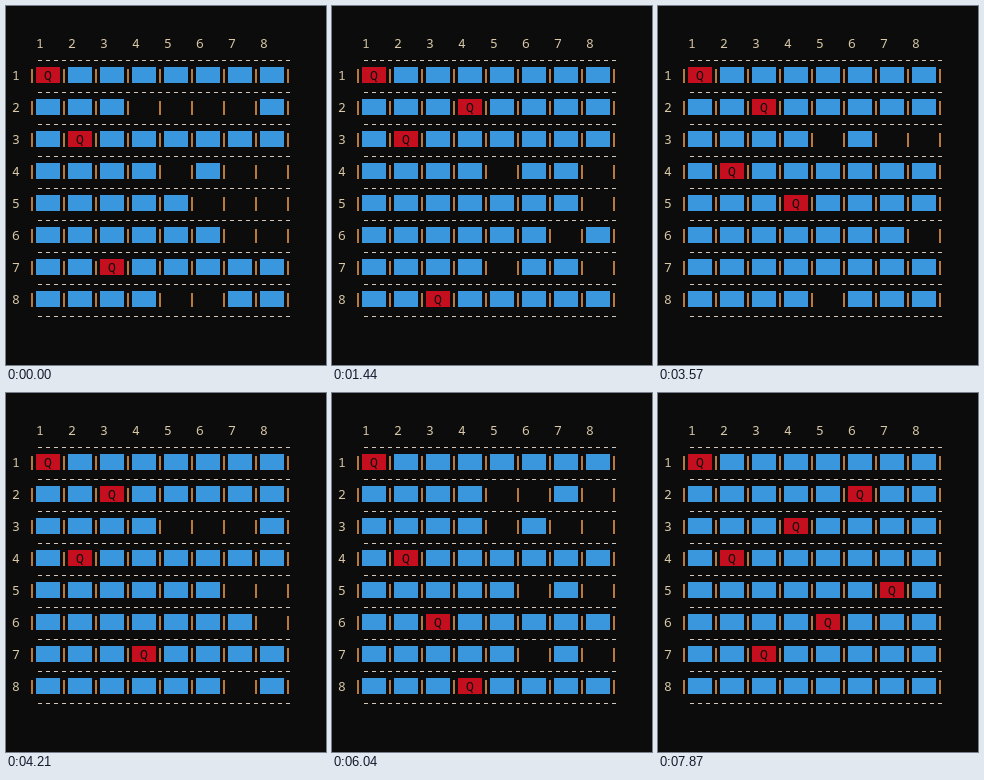
Animation, 320 px wide and 359 px high, one loop 8 s. Source, as an HTML page:

```html
<!DOCTYPE html>
<html lang="en">
<head>
<meta charset="utf-8">
<title>Eight queens</title>
<style>
  html, body { margin: 0; width: 100%; height: 100%; overflow: hidden; background: #0c0c0c; }
  svg { display: block; width: 320px; height: 359px; }
  text { font: 13px "Noto Sans Mono", "DejaVu Sans Mono", monospace; text-anchor: middle; fill: #d8c8a8; }
  .dashes { stroke: #d6c8b8; stroke-dasharray: 4; }
  .bar { fill: #b9783c; }
  .free { visibility: hidden; }
  .hit rect { fill: #3a96dd; }
  .queen rect { fill: #c50f1f; }
  .cell text { fill: #0c0c0c; visibility: hidden; }
  .queen text { visibility: visible; }
</style>
</head>
<body>
<svg viewBox="0 0 320 359"></svg>
<script>
const SIZE = 8, PITCH = 32, LEFT = 30, TOP = 61, LOOP = 8000;
const svg = document.querySelector('svg');

function add(parent, tag, attrs, content = '') {
  const node = document.createElementNS('http://www.w3.org/2000/svg', tag);
  for (const name in attrs) node.setAttribute(name, attrs[name]);
  node.textContent = content;
  return parent.appendChild(node);
}

function drawBoard() {
  const cells = [];
  for (let row = 0; row <= SIZE; row++) {
    const y = TOP + row * PITCH;
    add(svg, 'path', { class: 'dashes', d: `M${LEFT + 2} ${y - 6.5}h252` });
    if (row === SIZE) break;
    add(svg, 'text', { x: 10, y: y + 13 }, row + 1);
    add(svg, 'text', { x: LEFT + 4 + row * PITCH, y: 42 }, row + 1);
    for (let col = 0; col <= SIZE; col++) {
      const x = LEFT + col * PITCH;
      add(svg, 'rect', { class: 'bar', x: x - 5, y: y + 2, width: 2, height: 14 });
      if (col === SIZE) break;
      const node = add(svg, 'g', {});
      add(node, 'rect', { x, y, width: 24, height: 16 });
      add(node, 'text', { x: x + 12, y: y + 13 }, 'Q');
      cells.push({ row, col, node });
    }
  }
  return cells;
}

// queens[c] is the row of the queen in column c.
const attacked = (queens, col, row) => queens.some((r, c) =>
  c === col || r === row || Math.abs(r - row) === Math.abs(c - col));

// Depth-first search, yielding the board after every placement.
function* search(queens = []) {
  const col = queens.length;
  if (col === SIZE) return;
  for (let row = 0; row < SIZE; row++) {
    if (attacked(queens, col, row)) continue;
    const next = [...queens, row];
    yield next;
    yield* search(next);
  }
}

// Tempo as [step, ms]; steps in between are evenly spaced.
const tempo = [
  [0, 0], [1, 200], [5, 1140], [7, 1440], [12, 2380], [14, 2840],
  [20, 4210], [25, 5180], [29, 6040], [35, 6730], [42, 7870], [43, LOOP]
];

function stepAt(time) {
  const i = tempo.findIndex(([, ms]) => ms > time);
  const [s0, t0] = tempo[i - 1], [s1, t1] = tempo[i];
  return Math.floor(s0 + (s1 - s0) * (time - t0) / (t1 - t0) + 1e-6);
}

const cells = drawBoard();
const boards = [...search()];
const first = boards.findIndex(queens => queens.join('') === '026');

function show(queens) {
  for (const { row, col, node } of cells) {
    const state = queens[col] === row ? 'queen' : attacked(queens, col, row) ? 'hit' : 'free';
    node.setAttribute('class', 'cell ' + state);
  }
}

const start = performance.now();
let shown = -1;

function tick() {
  const step = stepAt((performance.now() - start) % LOOP);
  if (step !== shown) show(boards[first + step]);
  shown = step;
  requestAnimationFrame(tick);
}
tick();
</script>
</body>
</html>
```
